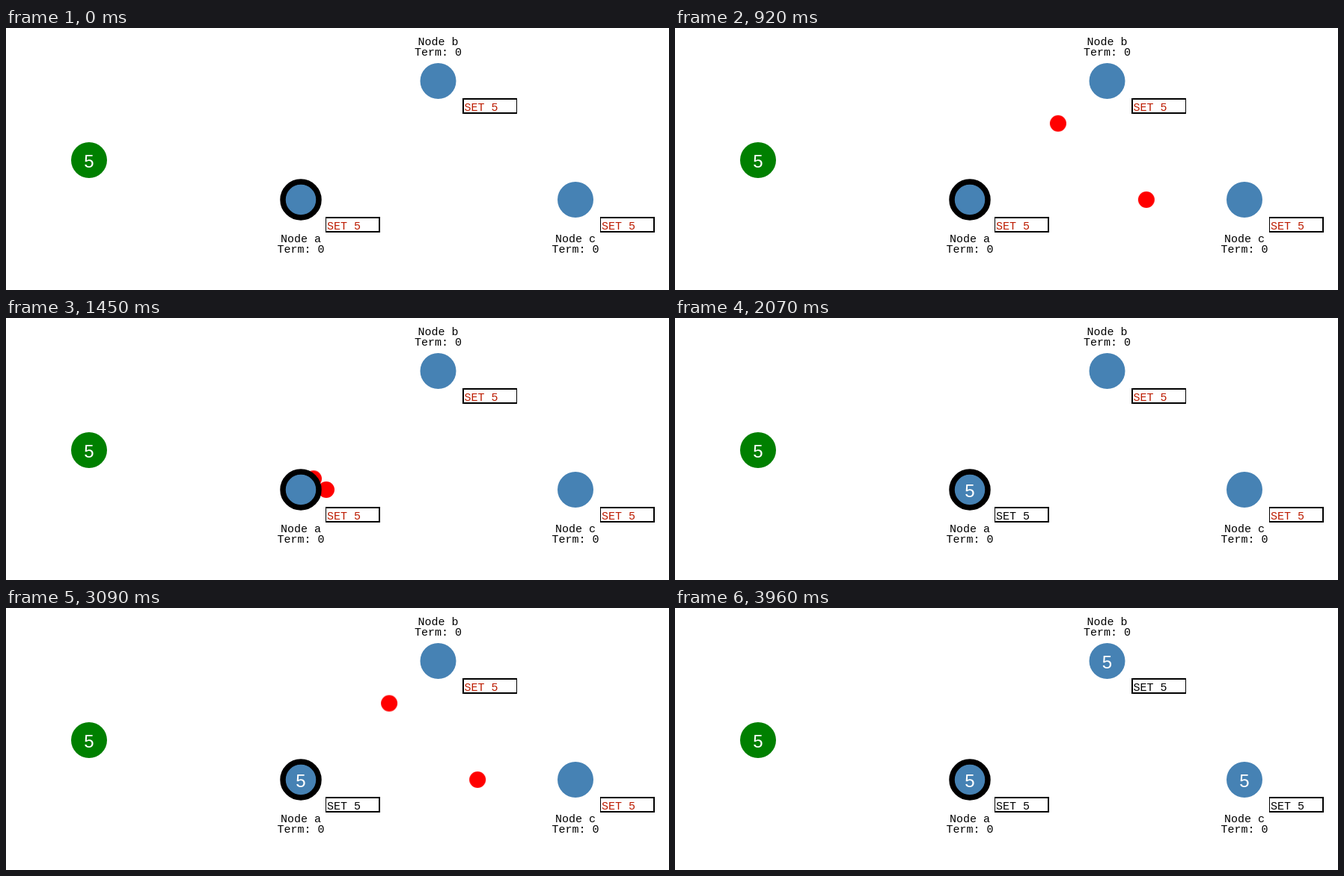
These frames come from a looping animation (886x351 px, 4330 ms). An HTML page:

```html
<!DOCTYPE html>
<html lang="en">
<head>
<meta charset="utf-8">
<title>Log replication</title>
<style>
  html, body { margin: 0; width: 100%; height: 100%; overflow: hidden; background: #fff; }
  svg { display: block; width: 886px; height: 351px; }
  .mono { font: 15px "Liberation Mono", "Courier New", monospace; }
  .label { text-anchor: middle; }
  .value { font: 24px "Liberation Sans", Arial, sans-serif; fill: #fff; text-anchor: middle; }
  .log { fill: none; stroke: #000; stroke-width: 1.5; shape-rendering: crispEdges; }
  .leader { stroke: #000; stroke-width: 7.5; }
</style>
</head>
<body>
<svg id="stage" viewBox="0 0 886 351"></svg>
<script>
const LOOP = 4330;
const TICK = 75.5;
const TRIP_TICKS = 12;
const FADE_TICKS = 7;
const stage = document.getElementById('stage');

const a = { name: 'a', x: 394, y: 230, labelY: 287, leader: true, commit: 1600 };
const b = { name: 'b', x: 577.5, y: 71, labelY: 23, commit: 3490 };
const c = { name: 'c', x: 761, y: 230, labelY: 287, commit: 3490 };

// A trip covers the share of the way between `from` and `to` in even ticks.
const reply = { start: 600, from: .043, to: .986 };
const notice = { start: 2560, from: .108, to: 1.026 };

function add(tag, attrs, text) {
  const el = document.createElementNS('http://www.w3.org/2000/svg', tag);
  for (const key in attrs) el.setAttribute(key, attrs[key]);
  if (text) el.textContent = text;
  return stage.appendChild(el);
}

// Rows are [ms, style, easing]; without an easing the style holds until the next row.
function play(el, rows) {
  const frames = rows.map(([ms, style, easing = 'step-end']) => ({ ...style, offset: ms / LOOP, easing }));
  frames.push({ ...rows[rows.length - 1][1], offset: 1 });
  el.animate(frames, { duration: LOOP, iterations: Infinity });
}

// Before and after its trip the dot rests out of sight below a node.
function send(sender, receiver, { start, from, to }) {
  const dot = add('circle', { r: 11, fill: 'red' });
  const at = p => {
    const x = sender.x + (receiver.x - sender.x) * p;
    const y = sender.y + (receiver.y - sender.y) * p;
    return { transform: `translate(${x}px, ${y}px)` };
  };
  play(dot, [
    [0, at(0)],
    [start, at(from), `steps(${TRIP_TICKS})`],
    [start + TRIP_TICKS * TICK, at(to)]
  ]);
}

function drawValue(x, y) {
  return add('text', { x, y: y + 10, class: 'value' }, '5');
}

function drawNode({ name, x, y, labelY, leader, commit }) {
  add('circle', { cx: x, cy: y, r: 24, fill: 'steelblue', class: leader ? 'leader' : '' });
  add('text', { x, y: labelY, class: 'mono label' }, 'Node ' + name);
  add('text', { x, y: labelY + 14, class: 'mono label' }, 'Term: 0');
  add('rect', { x: x + 33.5, y: y + 24, width: 71.5, height: 19, class: 'log' });

  const entry = add('text', { x: x + 35, y: y + 40, class: 'mono' }, 'SET 5');
  const red = { fill: '#bc1c00' };
  play(entry, [
    [0, red],
    [commit, red, `steps(${FADE_TICKS}, jump-start)`],
    [commit + FADE_TICKS * TICK, { fill: '#000' }]
  ]);
  play(drawValue(x, y), [[0, { opacity: 0 }], [commit, { opacity: 1 }]]);
}

for (const peer of [b, c]) {
  send(peer, a, reply);
  send(a, peer, notice);
}
add('circle', { cx: 111, cy: 177, r: 24, fill: 'green' });
drawValue(111, 177);
[a, b, c].forEach(drawNode);
</script>
</body>
</html>
```
